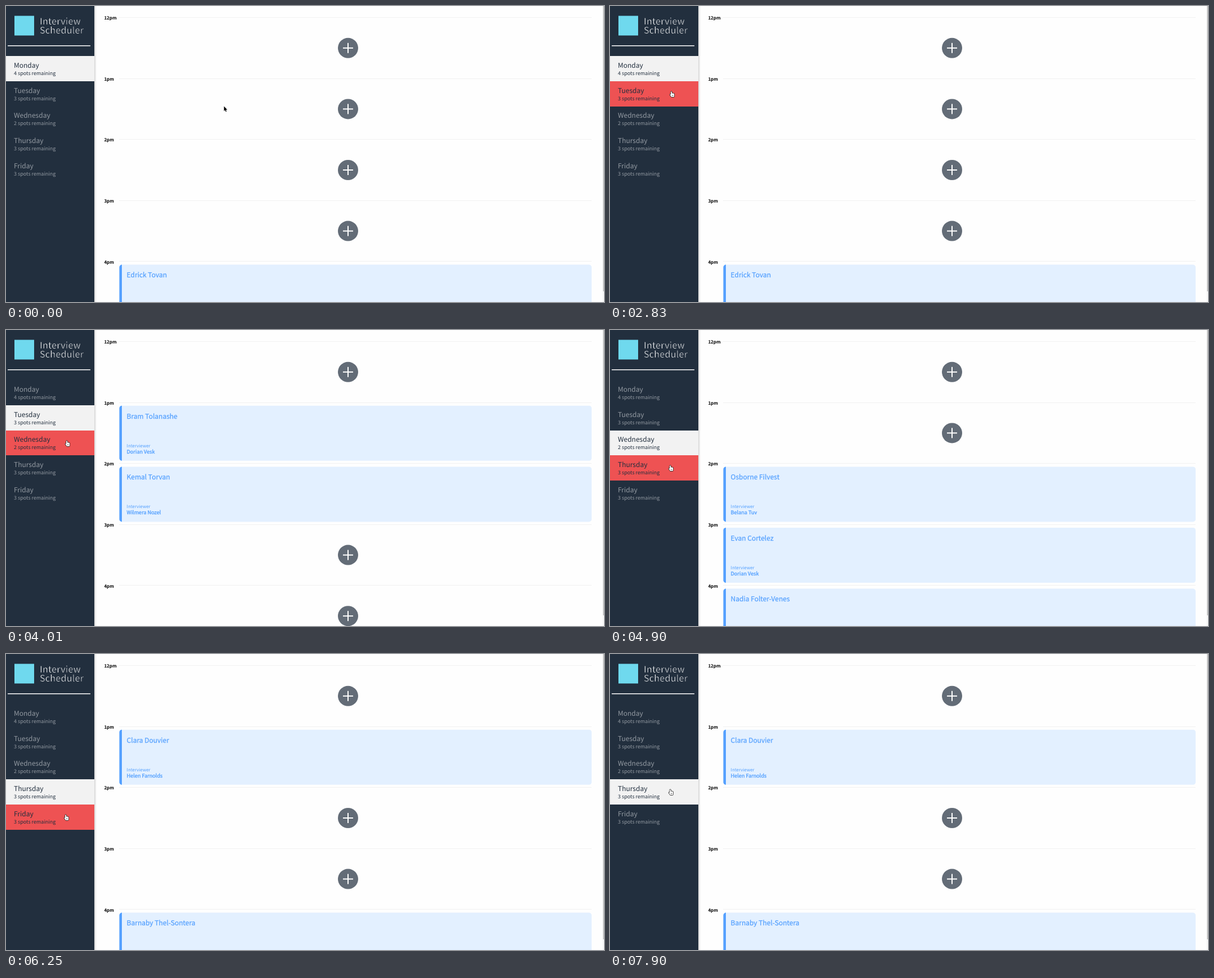
Animation of 1063 by 527 pixels, one loop 8 s. Source, as an HTML page with a canvas:

```html
<!DOCTYPE html>
<html lang="en">
<head>
<meta charset="utf-8">
<title>Interview Scheduler</title>
<style>
  html, body { margin: 0; width: 100%; height: 100%; overflow: hidden; background: #fefefe; }
  canvas { display: block; }
</style>
</head>
<body>
<canvas id="stage" width="1063" height="527"></canvas>
<script>
const canvas = document.getElementById('stage');
const ctx = canvas.getContext('2d');
const { width: W, height: H } = canvas;
const LOOP = 8000;
const STEP = 148.4;
const FONT = '"Noto Sans CJK JP", "Noto Sans CJK SC", "Noto Sans", sans-serif';
const NAVY = '#222f3e', RED = '#ee5253', BLUE = '#54a0ff', PAPER = '#fefefe';
const SIDEBAR = 157, ROW_TOP = 89.4, ROW = 44.65;
const SLOT_TOP = 20.5, SLOT = 108.6;

const HOURS = ['12pm', '1pm', '2pm', '3pm', '4pm'];

// Bookings: hour -> [student, interviewer].
const DAYS = [
  { name: 'Monday', spots: 4, bookings: { '4pm': ['Edrick Tovan'] } },
  { name: 'Tuesday', spots: 3, bookings: {
    '1pm': ['Bram Tolanashe', 'Dorian Vesk'],
    '2pm': ['Kemal Torvan', 'Wilmera Nozel'] } },
  { name: 'Wednesday', spots: 2, bookings: {
    '2pm': ['Osborne Filvest', 'Belana Tuv'],
    '3pm': ['Evan Cortelez', 'Dorian Vesk'],
    '4pm': ['Nadia Folter-Venes'] } },
  { name: 'Thursday', spots: 3, bookings: {
    '1pm': ['Clara Douvier', 'Helen Farnolds'],
    '4pm': ['Barnaby Thel-Sontera'] } },
  { name: 'Friday', spots: 3, bookings: {
    '1pm': ['Leonard Vung', 'Helen Farnolds'],
    '3pm': ['Nami Bruth', 'Orin Quel'] } }
];

// The pointer travels to each day in turn, rests, then clicks it.
const VISITS = [
  { day: 0, depart: 150, arrive: 1190, click: 0 },
  { day: 1, depart: 2090, arrive: 2830, click: 3130 },
  { day: 2, depart: 3278, arrive: 4010, click: 4310 },
  { day: 3, depart: 4458, arrive: 4900, click: 5350 },
  { day: 4, depart: 5498, arrive: 6250, click: 6550 },
  { day: 3, depart: 6850, arrive: 7450, click: 7750 }
];

const ease = p => p * p * (3 - 2 * p);
const mix = (a, b, p) => a + (b - a) * p;
const rowY = i => Math.round(ROW_TOP + ROW * i);

// Motion advances in even steps, as in a low frame rate recording.
function pointerAt(t) {
  let x = 387.5, y = 178.5;
  for (const { day, depart, arrive } of VISITS) {
    if (t < depart) break;
    const steps = Math.round((arrive - depart) / STEP) + 1;
    const done = Math.floor((t - depart) / STEP + 0.1) + 1;
    const p = ease(Math.min(1, done / steps));
    x = mix(x, 110 - day, p);
    y = mix(y, rowY(day) + 18, p);
  }
  return { x, y };
}

const selectedAt = t => VISITS.filter(v => t >= v.click).pop().day;

function box(x, y, w, h, color) {
  ctx.fillStyle = color;
  ctx.fillRect(x, y, w, h);
}

// An edge in the text colour thickens the letters, one in the background colour thins them.
function text(str, x, y, size, color, { weight = 400, spacing = 0, edge = 0, edgeColor = color } = {}) {
  ctx.font = `${weight} ${size}px ${FONT}`;
  ctx.letterSpacing = spacing + 'px';
  ctx.fillStyle = color;
  ctx.fillText(str, x, y);
  if (!edge) return;
  ctx.strokeStyle = edgeColor;
  ctx.lineWidth = edge;
  ctx.lineJoin = 'round';
  ctx.strokeText(str, x, y);
}

function drawAddButton(x, y) {
  ctx.fillStyle = '#636c77';
  ctx.beginPath();
  ctx.arc(x, y, 18, 0, Math.PI * 2);
  ctx.fill();
  box(x - 9, y - 1, 18, 2, '#fff');
  box(x - 1, y - 9, 2, 18, '#fff');
}

function drawCard(y, [student, interviewer]) {
  const left = 214.6;
  ctx.save();
  ctx.beginPath();
  ctx.roundRect(201.5, y + 5.7, 839.5, 98, 4.5);
  ctx.clip();
  box(201, y + 5, 841, 100, '#e3f0ff');
  box(201, y + 5, 5, 100, BLUE);
  ctx.restore();
  text(student, left, y + 28.4, 12, BLUE, { edge: 0.25 });
  if (interviewer) {
    text('Interviewer', left, y + 79.6, 7.9, BLUE);
    text(interviewer, left, y + 90.6, 9.1, BLUE, { edge: 0.35 });
  }
}

function drawSchedule(day) {
  HOURS.forEach((hour, i) => {
    const y = SLOT_TOP + SLOT * i;
    text(hour, 174.4, y + 3.6, 8, '#000', { weight: 700 });
    box(201, Math.round(y - 0.5), 840, 1, '#f1f1f1');
    const booking = day.bookings[hour];
    if (booking) drawCard(y, booking);
    else drawAddButton(608, y + SLOT / 2);
  });
  box(W - 3, 0, 3, H, '#f8f8f8');
  box(W - 1.5, 0, 1.5, 508, '#b9b9b9');
}

function drawSidebar(selected, hovered) {
  const shadow = ctx.createLinearGradient(SIDEBAR, 0, SIDEBAR + 4, 0);
  shadow.addColorStop(0, 'rgba(0,0,0,.16)');
  shadow.addColorStop(1, 'rgba(0,0,0,0)');
  box(SIDEBAR, 0, 4, H, shadow);
  box(0, 0, SIDEBAR, H, NAVY);

  box(15, 17.5, 35, 35, '#6fd9ee');
  ['Interview', 'Scheduler'].forEach((word, i) => {
    text(word, 60, 33.3 + 16 * i, 16.1, '#fff', { spacing: 0.25, edge: 0.5, edgeColor: NAVY });
  });
  box(3, 70, 147, 1.5, '#fff');

  DAYS.forEach(({ name, spots }, i) => {
    const y = ROW_TOP + ROW * i;
    const active = i === selected;
    const lit = active || i === hovered;
    if (lit) box(0, rowY(i), SIDEBAR, rowY(i + 1) - rowY(i), active ? '#f2f2f2' : RED);
    text(name, 14, y + 20.5, 12, lit ? NAVY : '#939aa2');
    text(`${spots} spots remaining`, 14, y + 33.6, 9, lit ? NAVY : '#939aa2');
  });
}

function drawArrow() {
  const shape = new Path2D('M0 0V8.4L1.9 6.7 3.2 9.8 4.6 9.2 3.3 6.2H5.9Z');
  ctx.strokeStyle = '#fff';
  ctx.lineWidth = 1.2;
  ctx.stroke(shape);
  ctx.fillStyle = '#000';
  ctx.fill(shape);
}

function drawHand() {
  const finger = new Path2D(), palm = new Path2D(), thumb = new Path2D();
  finger.roundRect(-0.8, 0.2, 1.9, 7, 0.9);
  palm.roundRect(-0.8, 3.5, 6, 6.5, 1.6);
  thumb.ellipse(-1.2, 6.7, 1.9, 0.8, Math.PI / 4, 0, Math.PI * 2);
  const parts = [finger, palm, thumb];
  ctx.strokeStyle = '#111';
  ctx.lineWidth = 1.3;
  parts.forEach(part => ctx.stroke(part));
  ctx.fillStyle = '#fff';
  parts.forEach(part => ctx.fill(part));
  for (const x of [1.1, 2.7]) box(x, 6.3, 0.6, 2.2, '#333');
}

function draw(t) {
  const pointer = pointerAt(t);
  const inMenu = pointer.x < SIDEBAR;
  const hovered = inMenu ? Math.floor((pointer.y - ROW_TOP) / ROW) : -1;
  const selected = selectedAt(t);

  box(0, 0, W, H, PAPER);
  drawSchedule(DAYS[selected]);
  drawSidebar(selected, hovered);

  ctx.save();
  ctx.translate(pointer.x, pointer.y);
  if (inMenu) drawHand();
  else drawArrow();
  ctx.restore();
}

ctx.textRendering = 'geometricPrecision';
const begin = performance.now();

function tick() {
  draw((performance.now() - begin) % LOOP);
  requestAnimationFrame(tick);
}
tick();
</script>
</body>
</html>
```
